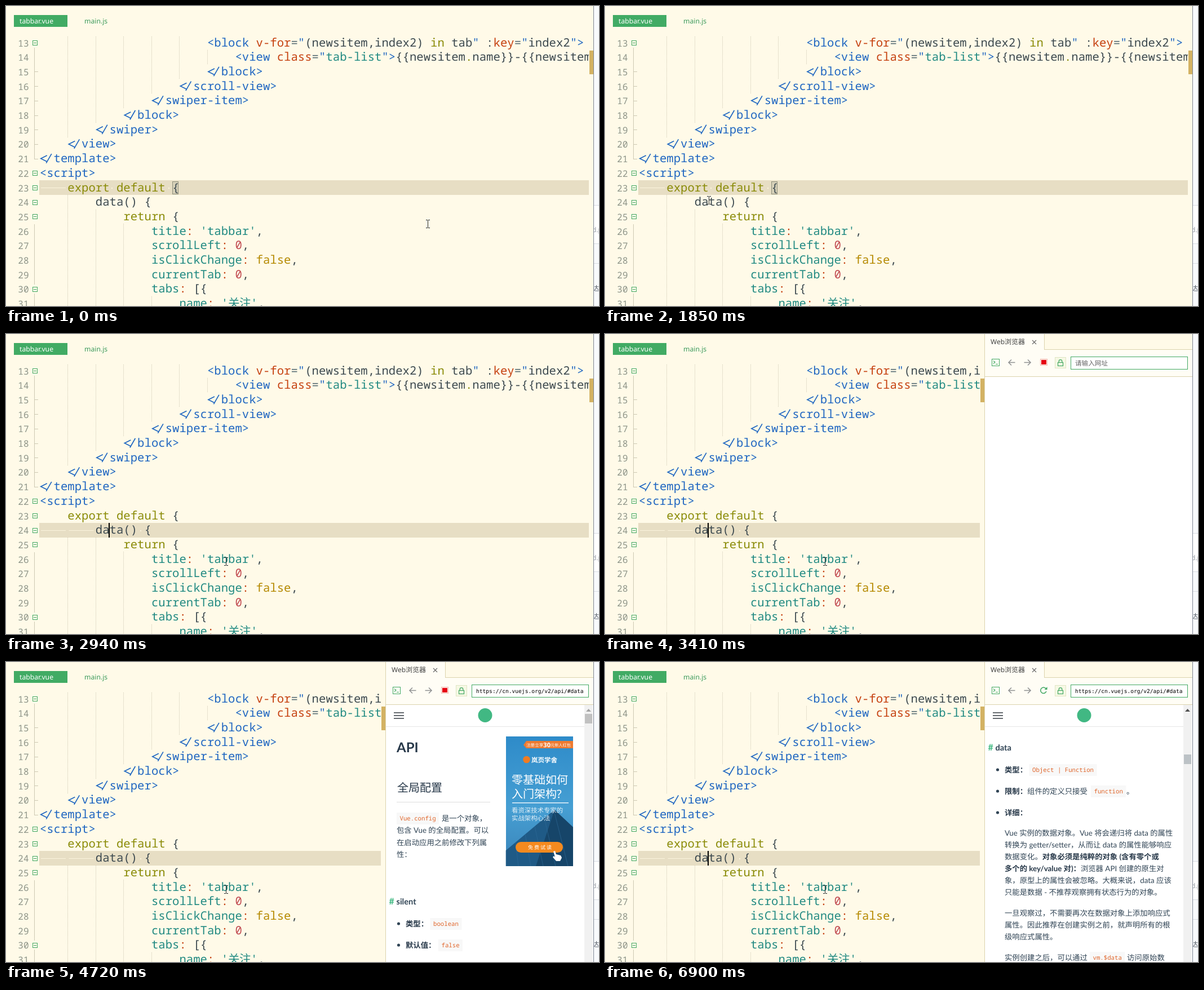
These frames come from a looping animation (1052 by 532 pixels, 7.2 s). An HTML page with a canvas:

```html
<!DOCTYPE html>
<html lang="zh">
<head>
<meta charset="utf-8">
<title>Editor with documentation panel</title>
<style>
html, body { margin: 0; width: 100%; height: 100%; overflow: hidden; background: #fffae8; }
canvas { display: block; width: 1052px; height: 532px; }
</style>
</head>
<body>
<canvas id="stage" width="1052" height="532"></canvas>
<script>
const g = document.getElementById('stage').getContext('2d');
const LOOP = 7200, LEFT = 59.8, CELL = 12.38, ROW = 25.7;
const MONO = '"Noto Sans Mono", "Noto Sans CJK SC", monospace';
const UI = '"Noto Sans", "Noto Sans CJK SC", sans-serif';
const DOC = 'Lato, "Noto Sans CJK SC", sans-serif';
const BG = '#fffae8', GREEN = '#41a863', INK = '#304455';
const INKS = {
  b: '#1f66c1', r: '#c5400f', d: '#3d4a50', o: '#8a8b08',
  t: '#218a82', n: '#c14a50', y: '#b58900', g: '#586e75'
};

// Each row: indent depth, then "~"-separated runs led by an ink key.
const CODE = [
  [6, 'b<block ~rv-for~g=~b"~d(newsitem,index2) ~oin ~dtab~b" ~d:~rkey~g=~b"~dindex2~b">'],
  [7, 'b<view ~rclass~g=~b"~ttab-list~b">~d{{newsitem~o.~dname}}-{{newsitem'],
  [6, 'b</block>'], [5, 'b</scroll-view>'], [4, 'b</swiper-item>'], [3, 'b</block>'],
  [2, 'b</swiper>'], [1, 'b</view>'], [0, 'b</template>'], [0, 'b<script>'],
  [1, 'oexport default ~d{'], [2, 'ddata() {'], [3, 'oreturn ~d{'],
  [4, "ttitle~r: ~t'tabbar'~d,"], [4, 'tscrollLeft~r: ~n0~d,'],
  [4, 'tisClickChange~r: ~yfalse~d,'], [4, 'tcurrentTab~r: ~n0~d,'],
  [4, 'ttabs~r: ~d[{'], [5, "tname~r: ~t'关注'~d,"]
];
const FOLDS = [13, 22, 23, 24, 25, 30];
const rowY = n => 65 + (n - 13) * ROW;

function rect(x, y, w, h, color) {
  g.fillStyle = color;
  g.fillRect(x, y, w, h);
}
function frame(x, y, w, h, color) {
  g.strokeStyle = color;
  g.lineWidth = 1;
  g.strokeRect(x + .5, y + .5, w - 1, h - 1);
}
function path(color, width, ...pts) {
  g.strokeStyle = color;
  g.lineWidth = width;
  g.beginPath();
  pts.forEach(([x, y]) => g.lineTo(x, y));
  g.stroke();
}
function shape(color, ...pts) {
  g.fillStyle = color;
  g.beginPath();
  pts.forEach(([x, y]) => g.lineTo(x, y));
  g.fill();
}
function dot(x, y, r, color) {
  g.fillStyle = color;
  g.beginPath();
  g.arc(x, y, r, 0, 7);
  g.fill();
}
function text(s, x, y, font, color, align = 'left') {
  g.font = font;
  g.fillStyle = color;
  g.textAlign = align;
  g.fillText(s, x, y);
  return x + g.measureText(s).width;
}
function clipped(x, y, w, h, draw) {
  g.save();
  g.beginPath();
  g.rect(x, y, w, h);
  g.clip();
  draw();
  g.restore();
}

// The joined "</" sign, two cells wide.
function closeSign(x, y, color) {
  path(color, 1.7, [x + 13, y - 12], [x + 2, y - 6.5], [x + 13, y - 1]);
  path(color, 1.7, [x + 11.5, y + 1.5], [x + 21, y - 15]);
}

function codeRow(depth, runs, y) {
  let x = LEFT + depth * 4 * CELL;
  g.font = '20.6px ' + MONO;
  g.textAlign = 'left';
  for (const run of runs.split('~')) {
    let s = run.slice(1);
    g.fillStyle = INKS[run[0]];
    if (s.startsWith('</')) {
      closeSign(x, y, INKS[run[0]]);
      x += 2 * CELL;
      s = s.slice(2);
    }
    for (const ch of s) {
      g.fillText(ch, x, y);
      x += ch > '\u2fff' ? 20 : CELL;
    }
  }
}

function guide(depth, first, last) {
  const x = Math.round(LEFT + depth * 4 * CELL);
  const end = Math.min(532, rowY(last) + ROW / 2);
  for (let y = Math.round(rowY(first) - ROW / 2); y < end; y += 2) rect(x, y, 1, 1, '#cfc9b4');
}

function gutter() {
  const rail = '#cdc8b2';
  rect(50, 74, 1, 197, rail);
  for (let n = 15; n <= 21; n++) rect(50, Math.round(rowY(n)), 7, 1, rail);
  rect(50, 387, 1, 107, rail);
  rect(50, 510, 1, 22, rail);
  for (let n = 13; n <= 31; n++) {
    text(n, 40.5, rowY(n) + 6.5, '16px ' + MONO, '#8d9488', 'right');
  }
  for (const n of FOLDS) {
    const y = Math.round(rowY(n)) - 4;
    rect(47, y, 9, 9, BG);
    frame(47, y, 9, 9, GREEN);
    rect(49, y + 4, 5, 1, GREEN);
  }
}

function editor(t) {
  const right = t < 3410 ? 1034 : 665;
  const active = t < 1920 ? 23 : 24;
  rect(0, 0, 1042, 532, BG);
  rect(14, 16, 95, 21, '#41ab64');
  text('tabbar.vue', 24, 31, '12.2px ' + UI, '#fff');
  text('main.js', 139, 31, '12.2px ' + UI, '#3e9b5d');
  gutter();
  clipped(59, 53, right - 59, 479, () => {
    for (let d = 1; d < 6; d++) guide(d, 13, 20 - d);
    guide(6, 14, 14);
    guide(1, 24, 31);
    guide(2, 25, 31);
    guide(3, 26, 31);
    guide(4, 31, 31);
    const top = active === 23 ? 309 : 335, mid = top + 13;
    rect(59, top, 975, 26, '#e7dec4');
    const mark = '#fbf4dc';
    for (let d = 0; d < active - 22; d++) rect(62 + d * 49.5, mid, 44, 1, mark);
    const spaces = active === 23 ? [187, 288] : [238];
    spaces.forEach(x => rect(x, mid, 2, 2, mark));
    if (active === 23) {
      rect(295, 311, 11, 23, '#d6d0b8');
      frame(295, 311, 11, 23, '#8f907c');
    }
    CODE.forEach(([depth, runs], i) => codeRow(depth, runs, rowY(13 + i) + 6.5));
  });
  rect(right + 1, 79, 7, 42, '#d3b263');
}

function backWindow() {
  rect(1042, 0, 10, 532, '#f8fafc');
  rect(1042, 0, 1, 532, '#7d8594');
  rect(1043, 354, 9, 67, '#fff');
  [353, 421, 456].forEach(y => rect(1043, y, 9, 1, '#d9dde3'));
  clipped(1043, 380, 9, 152, () => {
    text('d.p', 1040, 401, '12px ' + UI, '#9a9fa6');
    text('达', 1040, 505, '12px ' + UI, '#4d5560');
  });
}

function browserBar(t) {
  const line = '#dcd3ad', grey = '#8f9091';
  rect(673, 0, 369, 76, '#fffdf5');
  rect(780, 0, 262, 27, BG);
  rect(673, 0, 1, 532, line);
  rect(779, 0, 1, 28, line);
  rect(779, 27, 263, 1, line);
  rect(673, 75, 369, 1, line);
  text('Web浏览器', 684, 18, '12px ' + UI, '#444');
  path('#666', 1.1, [758, 11], [765, 18]);
  path('#666', 1.1, [765, 11], [758, 18]);

  frame(686, 44, 14, 13, GREEN);
  path(GREEN, 1.1, [689, 47.5], [692, 50], [689, 52.5]);
  rect(693, 53, 4, 1, GREEN);
  path(grey, 1.5, [727.5, 50.5], [716, 50.5]);
  path(grey, 1.5, [721, 45.5], [716, 50.5], [721, 55.5]);
  path(grey, 1.5, [743.5, 50.5], [755, 50.5]);
  path(grey, 1.5, [750, 45.5], [755, 50.5], [750, 55.5]);
  if (t < 5640) {
    frame(772, 44, 13, 12, '#f3b4aa');
    rect(774, 46, 9, 8, '#e60012');
  } else {
    g.strokeStyle = GREEN;
    g.lineWidth = 1.5;
    g.beginPath();
    g.arc(778, 50.3, 5.2, .35, 5.5);
    g.stroke();
    shape(GREEN, [784.5, 44], [784.5, 49], [779.5, 49]);
  }
  rect(798, 41, 20, 20, '#f6f8e4');
  frame(798, 41, 20, 20, '#dfe5c4');
  g.strokeStyle = GREEN;
  g.lineWidth = 1.2;
  g.strokeRect(803.5, 50.5, 9, 6);
  g.beginPath();
  g.arc(808, 48.5, 2.8, Math.PI, 0);
  g.lineTo(810.8, 50.5);
  g.moveTo(805.2, 48.5);
  g.lineTo(805.2, 50.5);
  g.stroke();
  rect(826, 40, 208, 23, '#fff');
  frame(826, 40, 208, 23, GREEN);
  if (t < 3580) text('请输入网址', 834, 56, '11.6px ' + UI, '#666');
  else text('https://cn.vuejs.org/v2/api/#data', 834, 55, '9.6px "DejaVu Sans Mono", monospace', '#000');
  rect(674, 76, 368, 456, '#fff');
}

// Inline code chip; the text starts a little inside the box.
function chip(s, x, y, font = MONO) {
  g.font = '10.7px ' + font;
  const w = g.measureText(s).width;
  rect(x, y - 10, w + 11, 21, '#f8f8f8');
  text(s, x + 5.5, y + 4, g.font, '#e0652a');
}
const para = (s, x, y) => text(s, x, y + 5, '13.35px ' + DOC, INK);
const strong = (s, x, y) => text(s, x, y + 5, 'bold 13.35px ' + DOC, '#273849');
function item(label, y) {
  dot(696.5, y, 2.6, INK);
  return strong(label, 709, y);
}
function anchor(s, y) {
  text('#', 679.5, y + 5, 'bold 16px ' + DOC, '#42b983');
  text(s, 692.5, y + 5, 'bold 14.6px ' + DOC, INK);
}

function pageFrame(t, thumb) {
  rect(674, 114, 352, 1, '#e6e6e6');
  if (t >= 4720) [89, 94, 99].forEach(y => rect(688, y, 18, 2, '#666b70'));
  dot(850, 94.5, 12.5, '#41b883');
  rect(1026, 76, 15, 456, '#f1f1f1');
  shape(t < 4950 ? '#a3a3a3' : '#505050', [1029, 88], [1033.5, 83], [1038, 88]);
  rect(1027, thumb, 13, 17, t < 4950 ? '#c1c1c1' : '#bcc2c6');
}

function advert() {
  const sky = g.createLinearGradient(0, 132, 0, 362);
  sky.addColorStop(0, '#2e8bc9');
  sky.addColorStop(.55, '#469fd3');
  sky.addColorStop(1, '#3a83b8');
  rect(887, 132, 119, 230, sky);
  shape('#1f5a86', [887, 334], [973, 262], [1006, 293], [1006, 362], [887, 362]);
  shape('#164569', [973, 262], [1006, 293], [1006, 362], [940, 362]);
  for (let i = 0; i < 6; i++) {
    path('#2f6c99', .6, [887 + i * 17, 334 - i * 14.2], [887 + i * 22, 362]);
  }
  shape('#ee7a30', [918, 147], [923, 140], [1006, 140], [1006, 153], [923, 153]);
  let x = text('注册立享', 923, 150, '7.6px ' + UI, '#fff');
  x = text('30', x, 151, 'bold 11px ' + UI, '#fff');
  text('元新人红包', x, 150, '7.2px ' + UI, '#fff');
  dot(923.5, 173, 6.3, '#f07c22');
  text('岚页学舍', 932, 177.5, 'bold 11.5px ' + UI, '#fff');
  text('零基础如何', 897, 216, '500 20px ' + UI, '#fff');
  text('入门架构?', 897, 241, '500 20px ' + UI, '#fff');
  rect(898, 249, 100, 1.5, '#e8f4fb');
  text('看资深技术专家的', 897, 266.5, '11.4px ' + UI, '#e3f0f8');
  text('实战架构心法', 897, 280.5, '11.4px ' + UI, '#e3f0f8');
  g.fillStyle = '#f58a1f';
  g.beginPath();
  g.roundRect(904, 319, 84, 19, 9.5);
  g.fill();
  [...'免费试读'].forEach((c, i) => text(c, 926 + i * 11, 332, '9px ' + UI, '#fff'));
  shape('#fff', [971, 336], [974, 335], [976, 341], [984, 343], [986, 347], [983, 353],
    [976, 353], [970, 346], [972, 344], [974, 346]);
}

function apiPage(t) {
  const ad = t >= 4180, ready = t >= 4720;
  const mono = ready ? MONO : '"Liberation Mono", monospace';
  pageFrame(t, 92);
  text('API', 693, 159.5, 'bold 24px ' + (ready ? DOC : '"Liberation Sans", sans-serif'), '#273849');
  text('全局配置', 694, 229.5, '500 20px ' + DOC, '#273849');
  rect(693, 248, ad ? 166 : 313, 1, '#ddd');
  chip('Vue.config', 693, 277, mono);
  const lines = ad
    ? ['是一个对象，', '包含 Vue 的全局配置。可以', '在启动应用之前修改下列属', '性：']
    : ['是一个对象，包含 Vue 的全局配置。', '可以在启动应用之前修改下列属性：'];
  lines.forEach((s, i) => para(s, i ? 693 : 773, 277 + i * 21.3));
  const up = ad ? 0 : 53;
  anchor('silent', 425 - up);
  item('类型：', 464 - up);
  chip('boolean', 752.5, 464 - up, mono);
  item('默认值：', 502 - up);
  chip('false', 767, 502 - up, mono);
  if (ad) advert();
  else item('用法：', 487);
}

function dataPage(t) {
  pageFrame(t, 164);
  anchor('data', 152);
  item('类型：', 191);
  chip('Object | Function', 752.5, 191);
  para('组件的定义只接受', item('限制：', 229), 229);
  chip('function', 862, 229);
  para('。', 925, 229);
  item('详细：', 267);
  para('Vue 实例的数据对象。Vue 将会递归将 data 的属性', 709, 303);
  para('转换为 getter/setter，从而让 data 的属性能够响应', 709, 324);
  strong('对象必须是纯粹的对象 (含有零个或', para('数据变化。', 709, 345), 345);
  para('浏览器 API 创建的原生对', strong('多个的 key/value 对)：', 709, 366), 366);
  para('象，原型上的属性会被忽略。大概来说，data 应该', 709, 387);
  para('只能是数据 - 不推荐观察拥有状态行为的对象。', 709, 408);
  para('一旦观察过，不需要再次在数据对象上添加响应式', 709, 444.5);
  para('属性。因此推荐在创建实例之前，就声明所有的根', 709, 466);
  para('级响应式属性。', 709, 487);
  para('实例创建之后，可以通过', 709, 524);
  chip('vm.$data', 860, 524);
  para('访问原始数', 926, 524);
}

// Pointer path: time, x, y; sampled in coarse steps as on a screen recording.
const TRAIL = [[52, 748, 386], [480, 590, 420], [840, 420, 461], [1000, 355, 478],
  [1200, 290, 460], [1620, 193, 357], [1770, 184, 344]];
function trailAt(t) {
  const last = TRAIL.length - 1;
  if (t >= TRAIL[last][0]) return TRAIL[last].slice(1);
  let i = 0;
  while (t >= TRAIL[i + 1][0]) i++;
  const a = TRAIL[i], b = TRAIL[i + 1], h = b[0] - a[0], u = (t - a[0]) / h;
  const slope = (k, c) => {
    const p = TRAIL[Math.max(0, k - 1)], q = TRAIL[Math.min(last, k + 1)];
    return (q[c] - p[c]) / (q[0] - p[0]) * h;
  };
  return [1, 2].map(c => {
    const d = b[c] - a[c], m = slope(i, c), n = slope(i + 1, c);
    return a[c] + u * (m + u * (3 * d - 2 * m - n + u * (m + n - 2 * d)));
  });
}
function pointerAt(t) {
  if (t < 130) return [748, 386];
  if (t < 2090) return trailAt(130 + Math.floor((t - 130) / 77.8) * 77.8);
  const u = t < 2170 ? .4 : t < 2250 ? .8 : 1;
  return [184 + 206 * u, 344 + 59 * u];
}
function pointer(t) {
  const [x, y] = pointerAt(t).map(Math.round), ink = '#24282a';
  rect(x, y - 6, 1, 13, ink);
  for (const end of [y - 7, y + 7]) {
    rect(x - 3, end, 3, 1, ink);
    rect(x + 1, end, 3, 1, ink);
  }
}

const BLINKS = [[440, 910], [1370, 1840], [1920, 2480], [2940, 3490], [3970, 4410],
  [4950, 5410], [5880, 6420], [6900, 7200]];
function caret(t) {
  if (!BLINKS.some(([on, off]) => t >= on && t < off)) return;
  if (t < 1920) rect(306, 309, 2, 26, '#000');
  else rect(182, 335, 2, 26, '#000');
}

function draw(t) {
  editor(t);
  backWindow();
  if (t >= 3410) {
    browserBar(t);
    clipped(674, 76, 368, 456, () => {
      if (t >= 4950) dataPage(t);
      else if (t >= 3870) apiPage(t);
    });
  }
  caret(t);
  pointer(t);
}

g.textRendering = 'geometricPrecision';
const start = performance.now();
function tick() {
  draw((performance.now() - start) % LOOP);
  requestAnimationFrame(tick);
}
tick();
</script>
</body>
</html>
```
